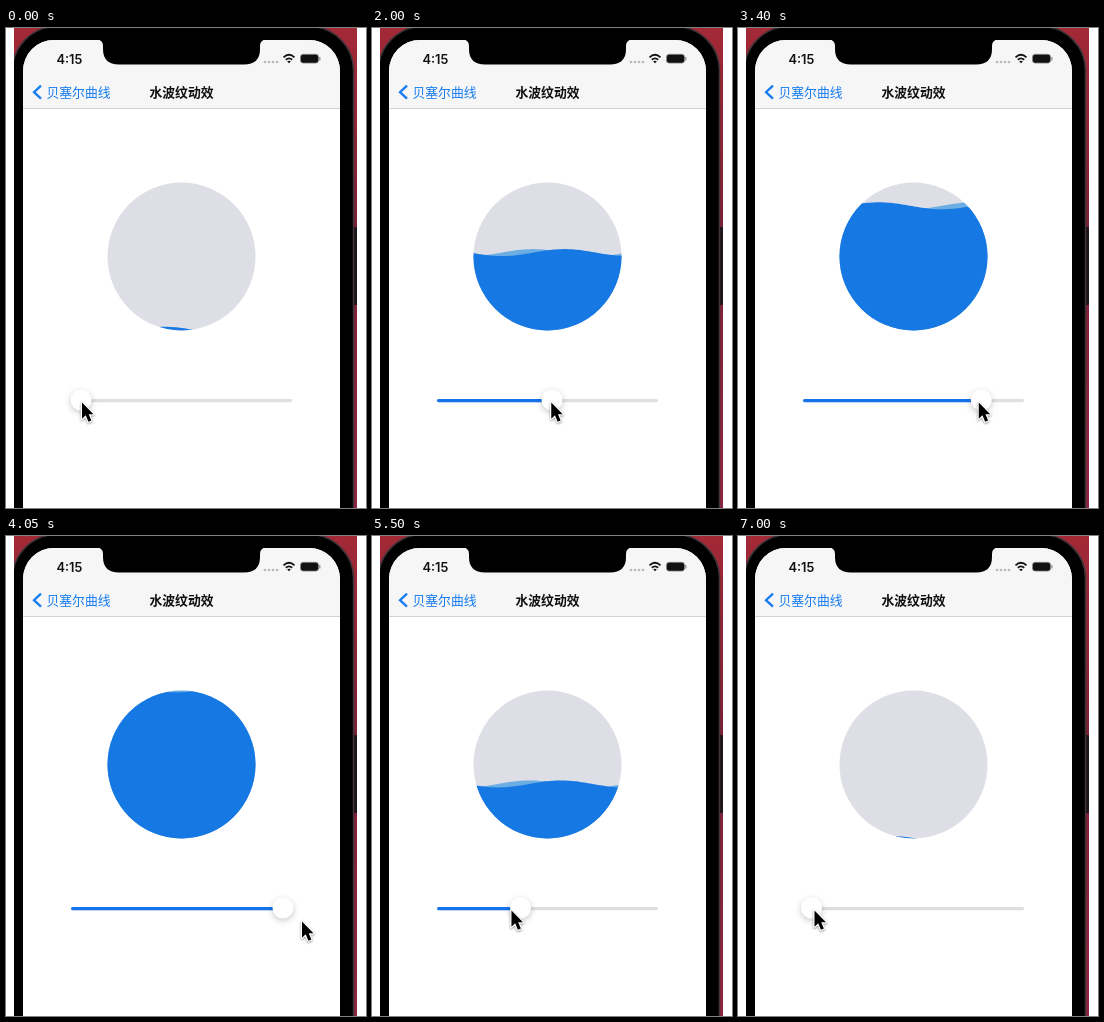
An HTML page for the animation above (7050 ms loop, 360 by 480 pixels).

```html
<!DOCTYPE html>
<html lang="zh">
<head>
<meta charset="utf-8">
<title>水波纹动效</title>
<style>
  html, body { margin: 0; width: 100%; height: 100%; overflow: hidden; background: #fff; }
  svg { display: block; }
  .cjk { font: 500 12.8px "Noto Sans CJK SC", "Noto Sans CJK", sans-serif; }
  .title { font-weight: 700; }
  .clock { font: 600 12.8px Inter, sans-serif; }
  #knob { filter: drop-shadow(0 2px 3px rgba(0, 0, 0, .22)); }
  #cursor { filter: drop-shadow(0 1px 1px rgba(0, 0, 0, .4)); }
</style>
</head>
<body>
<svg width="360" height="480" viewBox="0 0 360 480">
  <defs>
    <linearGradient id="wall" x2="0" y2="1">
      <stop offset="0" stop-color="#a32936"/>
      <stop offset=".4" stop-color="#7c2034"/>
      <stop offset="1" stop-color="#8f2440"/>
    </linearGradient>
    <clipPath id="stage"><path d="M8 0H351V480H8Z"/></clipPath>
    <clipPath id="screen"><rect x="17" y="12" width="317" height="520" rx="31"/></clipPath>
    <clipPath id="ball"><circle cx="175.5" cy="228.5" r="74"/></clipPath>
  </defs>

  <g clip-path="url(#stage)">
    <path fill="url(#wall)" d="M8 0H351V480H8Z"/>
    <rect x="347" y="199" width="4" height="78" rx="1" fill="#1d1418"/>
    <rect x="6.5" y="-1.5" width="341" height="540" rx="44" stroke="#40343a" stroke-width="1.5"/>
  </g>

  <g clip-path="url(#screen)">
    <path fill="#fff" d="M17 12H334V480H17Z"/>
    <path fill="#f6f6f7" d="M17 12H334V80H17Z"/>
    <path fill="#d2d2d4" d="M17 80H334V81H17Z"/>
  </g>
  <path d="M91 11.5Q97 12 97 18V21Q97 36.5 113 36.5H238Q254 36.5 254 21V18Q254 12 260 11.5Z"/>

  <text class="clock" x="50.5" y="35.5" fill="#111">4:15</text>
  <g fill="#b9b9bc">
    <circle cx="259" cy="34" r="1.3"/><circle cx="263" cy="34" r="1.3"/>
    <circle cx="267" cy="34" r="1.3"/><circle cx="271" cy="34" r="1.3"/>
  </g>
  <path d="M277.5 29.3Q283 24.3 288.5 29.3M279.8 31.8Q283 29 286.2 31.8"
        fill="none" stroke="#111" stroke-width="1.8"/>
  <path d="M281.2 33.4Q283 32 284.8 33.4L283 35.3Z" fill="#111"/>
  <rect x="294.5" y="26.3" width="18" height="8.8" rx="2.8" fill="#111" stroke="#888" stroke-width=".8"/>
  <path d="M313.8 29V32.5" stroke="#888" stroke-width="1.2"/>

  <path d="M35 57.7L28 64.2L35 70.7" fill="none" stroke="#167cf0" stroke-width="2.3"/>
  <text class="cjk" x="40.5" y="68.8" fill="#167cf0">贝塞尔曲线</text>
  <text class="cjk title" x="143.5" y="68.8" fill="#111">水波纹动效</text>

  <circle cx="175.5" cy="228.5" r="74" fill="#dedee6"/>
  <g clip-path="url(#ball)">
    <path id="back" fill="#6caee3"/>
    <path id="front" fill="#1678e3"/>
  </g>

  <rect x="65" y="371" width="221" height="3.2" rx="1.6" fill="#dfdfe1"/>
  <rect id="fill" x="65" y="371" height="3.2" rx="1.6" fill="#1674ea"/>
  <circle id="knob" cy="372" r="10.5" fill="#fff"/>
  <path id="cursor" d="M0 0V16.2L3.7 12.8L6.4 19.2L9.4 17.9L6.7 11.7H11.5Z"
        stroke="#fff" stroke-width="2.4" paint-order="stroke" stroke-linejoin="round"/>
</svg>

<script>
const LOOP = 7050, STEP = 50;
const OMEGA = 0.05, AMP = 3.5, WAVES_PER_LOOP = 8;
const KNOB_MIN = 75, KNOB_TRAVEL = 200;
const BALL_BOTTOM = 302.3, BALL_SIZE = 148;

// Spans in ms during which the picture stands still.
const holds = [[0, 700], [700, 1150], [4800, 4950], [4950, 5100]];

const [back, front, fill, knob, cursor] =
  ["back", "front", "fill", "knob", "cursor"].map(id => document.getElementById(id));

// 0 before a, 1 after b, linear between.
const ramp = (t, a, b) => Math.min(1, Math.max(0, (t - a) / (b - a)));

const knobX = t => KNOB_MIN
  + 83 * ramp(t, 300, 1150) + 44 * ramp(t, 1150, 2850) + 75 * ramp(t, 2850, 3850)
  - 203.5 * ramp(t, 4420, 6130);

// The pointer drifts around the knob and overshoots at the right end.
function pointer(t) {
  const over = ramp(t, 3500, 4050), back = ramp(t, 4250, 4900);
  const drift = 1 - 3.5 * ramp(t, 1150, 2850) + 21.5 * over - 28 * back + 12 * ramp(t, 6100, 7000);
  return [knobX(t) + drift, 374.5 + 11 * (over - back)];
}

function wave(level, phase) {
  let d = "M100 310";
  for (let x = 100; x <= 252; x += 2) {
    d += `L${x} ${(level - AMP * Math.cos(OMEGA * x - phase)).toFixed(2)}`;
  }
  return d + "V310Z";
}

function stepped(t) {
  const hold = holds.find(([from, to]) => t >= from && t < to);
  return hold ? hold[0] : Math.floor(t / STEP) * STEP;
}

function draw(time) {
  const t = stepped(time % LOOP);
  const k = knobX(t);
  const level = BALL_BOTTOM - BALL_SIZE * (k - KNOB_MIN) / KNOB_TRAVEL;
  const phase = 1.65 + 2 * Math.PI * WAVES_PER_LOOP * t / LOOP;
  back.setAttribute("d", wave(level, phase - Math.PI / 2));
  front.setAttribute("d", wave(level, phase));
  fill.setAttribute("width", k - 65);
  knob.setAttribute("cx", k);
  cursor.setAttribute("transform", `translate(${pointer(t)})`);
}

const start = performance.now();
function tick() {
  draw(performance.now() - start);
  requestAnimationFrame(tick);
}
tick();
</script>
</body>
</html>
```
